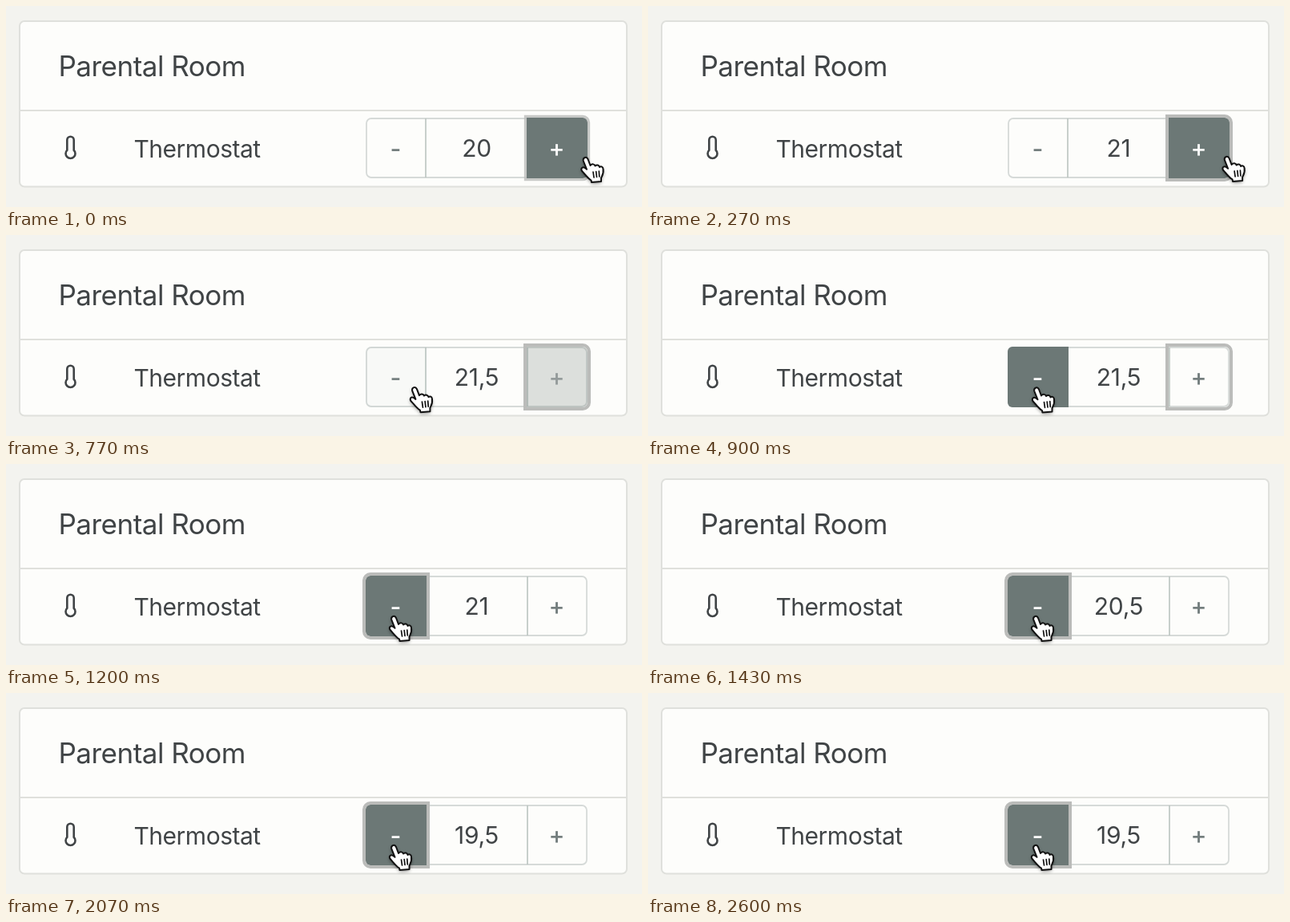
An HTML page with a canvas for the animation above (2.63 s loop, 794 px wide and 252 px high).

```html
<!DOCTYPE html>
<html lang="en">
<head>
<meta charset="utf-8">
<title>Thermostat</title>
<style>
  html, body { margin: 0; width: 100%; height: 100%; overflow: hidden; background: #f3f3ef; }
  canvas { display: block; }
</style>
</head>
<body>
<canvas id="stage" width="794" height="252"></canvas>
<script>
const ctx = document.getElementById('stage').getContext('2d');
const LOOP = 2630;
const FADE = 150;
const FONT = 'Inter, "Open Sans", sans-serif';
const PAGE = '#f3f3ef';
const CARD = '#fdfdfb';
const BORDER = '#dfe0dc';
const FILL = '#6c7876';
const INK = '#404446';

// [time, temperature]
const READINGS = [
  [0, '20'], [40, '20,5'], [240, '21'], [440, '21,5'],
  [1060, '21'], [1260, '20,5'], [1460, '20'], [1660, '19,5']
];

const MINUS = { x: 449, label: '-', corners: [6, 0, 0, 6] };
const PLUS = { x: 650, label: '+', corners: [0, 6, 6, 0] };
const TOP = 140, SIZE = 76;

const HAND = new Path2D('M-3.8 4C-4.5-.5 .5-1.5 2 2L5 10C7 7.5 10.5 8 11 10.5' +
  'C13 8.5 16 9.5 16.5 12C18.5 10.5 21 11.5 21 14.5C22 20 20 22.5 18.5 25.5' +
  'L18.5 30L6.5 31L6 28.5C2.5 26.5-1 22-4 18.5C-8 15-6 11-2 12.8L.5 14.8Z');
const FINGERS = new Path2D('M8.5 18L9.5 25M12.2 17.5L13 24.5M15.8 17L16.3 24');

const clamp = v => Math.min(1, Math.max(0, v));
const lerp = (a, b, u) => a + (b - a) * u;
const progress = (t, from, to) => clamp((t - from) / (to - from));

function fade(t, start) {
  const u = progress(t, start, start + FADE);
  return u * u * (3 - 2 * u);
}

function roundRect(x, y, w, h, radii) {
  ctx.beginPath();
  ctx.roundRect(x, y, w, h, radii);
}

function line(x1, y1, x2, y2, color, width) {
  ctx.strokeStyle = color;
  ctx.lineWidth = width;
  ctx.beginPath();
  ctx.moveTo(x1, y1);
  ctx.lineTo(x2, y2);
  ctx.stroke();
}

function text(label, x, y, size, align = 'left', spacing = -0.5) {
  ctx.font = `${size}px ${FONT}`;
  ctx.letterSpacing = spacing + 'px';
  ctx.textAlign = align;
  ctx.fillText(label, x, y);
}

// Centres the visible part of a glyph on a point.
function sign(label, x, y, color) {
  ctx.fillStyle = color;
  ctx.font = `500 30px ${FONT}`;
  ctx.letterSpacing = '0px';
  ctx.textAlign = 'left';
  const m = ctx.measureText(label);
  ctx.fillText(label,
    x - (m.actualBoundingBoxRight - m.actualBoundingBoxLeft) / 2,
    y + (m.actualBoundingBoxAscent - m.actualBoundingBoxDescent) / 2);
}

function drawCard() {
  ctx.fillStyle = PAGE;
  ctx.fillRect(0, 0, 794, 252);
  roundRect(17, 19, 758, 207.5, 6);
  ctx.fillStyle = CARD;
  ctx.fill();
  ctx.strokeStyle = BORDER;
  ctx.lineWidth = 2;
  ctx.stroke();
  line(18, 131, 774, 131, BORDER, 2);

  ctx.fillStyle = INK;
  text('Parental Room', 65.5, 88, 35);
  text('Thermostat', 159.5, 190, 30);
}

function drawThermometer() {
  ctx.strokeStyle = INK;
  ctx.lineWidth = 2.6;
  ctx.beginPath();
  ctx.arc(80.5, 168, 4.2, Math.PI, 0);
  ctx.lineTo(84.7, 180);
  ctx.arc(80.5, 185, 6, -0.8, Math.PI + 0.8);
  ctx.closePath();
  ctx.stroke();
}

function drawButton({ x, label, corners }, hover, focus) {
  if (hover > 0) {
    ctx.globalAlpha = hover;
    roundRect(x, TOP, SIZE, SIZE, corners);
    ctx.fillStyle = FILL;
    ctx.fill();
    ctx.globalAlpha = 1;
  }
  if (focus > 0) {
    const spread = 4 * focus;
    ctx.globalAlpha = focus;
    ctx.beginPath();
    ctx.roundRect(x - spread, TOP - spread, SIZE + 2 * spread, SIZE + 2 * spread,
      corners.map(r => r && r + spread));
    ctx.roundRect(x, TOP, SIZE, SIZE, corners);
    ctx.fillStyle = '#bbbcba';
    ctx.fill('evenodd');
    ctx.globalAlpha = 1;
  }
  const tone = [116, 126, 126].map(c => Math.round(lerp(c, 252, hover)));
  sign(label, x + SIZE / 2 - 0.5, 180.5, `rgb(${tone})`);
}

function drawStepper(t) {
  roundRect(450, 141, 275, 74, 6);
  ctx.strokeStyle = '#d6dad8';
  ctx.lineWidth = 1.8;
  ctx.stroke();
  for (const x of [524, 651]) line(x, 141, x, 215, '#bac3c0', 1.6);

  const switched = fade(t, 960);
  drawButton(MINUS, fade(t, 755), switched);
  drawButton(PLUS, 1 - fade(t, 668), fade(t, -105) * (1 - switched));

  const reading = READINGS.filter(([start]) => t >= start).pop()[1];
  ctx.fillStyle = INK;
  text(reading, 587.5, 189.3, 30, 'center', -0.3);
}

function cursorAt(t) {
  const drift = progress(t, 0, 530);
  const travel = 1 - (1 - progress(t, 590, 900) ** 2) ** 5.4;
  const settle = progress(t, 900, 1000);
  return [
    lerp(lerp(724.5, 722.7, drift), 486, travel) - settle,
    lerp(lerp(190, 188, drift), 191.5, travel) - settle * 0.5
  ];
}

function drawCursor(t) {
  ctx.save();
  ctx.translate(...cursorAt(t));
  ctx.lineJoin = ctx.lineCap = 'round';
  ctx.shadowColor = 'rgba(0, 0, 0, 0.45)';
  ctx.shadowBlur = 4;
  ctx.shadowOffsetY = 2;
  ctx.fillStyle = '#fff';
  ctx.fill(HAND);
  ctx.shadowColor = 'transparent';
  ctx.strokeStyle = '#111';
  ctx.lineWidth = 2;
  ctx.stroke(HAND);
  ctx.lineWidth = 1.7;
  ctx.stroke(FINGERS);
  ctx.restore();
}

const started = performance.now();

function render() {
  const t = (performance.now() - started) % LOOP;
  drawCard();
  drawThermometer();
  drawStepper(t);
  drawCursor(t);
  requestAnimationFrame(render);
}

render();
</script>
</body>
</html>
```
